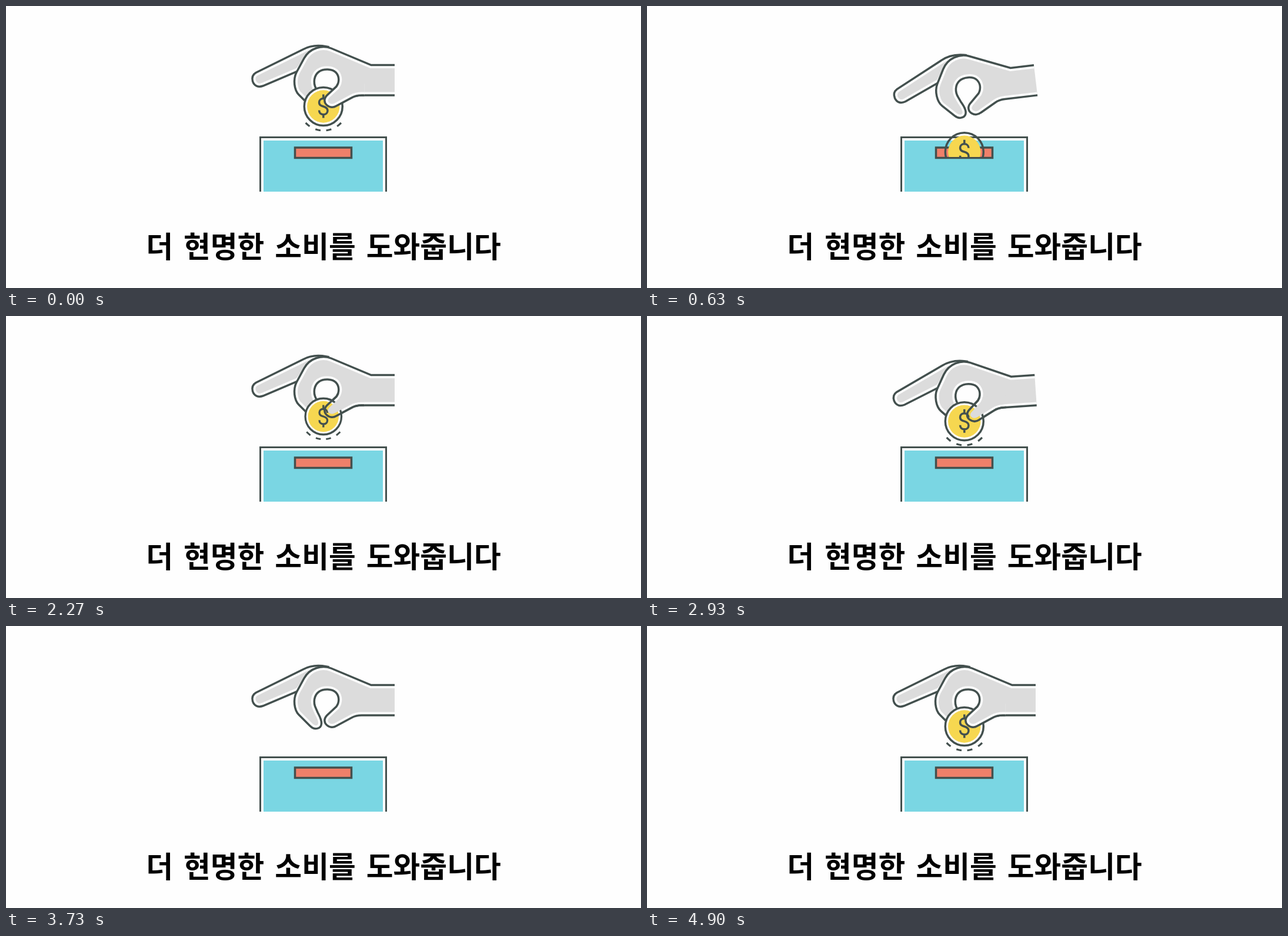
An HTML page with a canvas that plays this animation: 1080x480 px, repeating every 5010 ms.

```html
<!DOCTYPE html>
<html lang="ko">
<head>
<meta charset="utf-8">
<title>더 현명한 소비</title>
<style>
  html, body { margin: 0; width: 100%; height: 100%; overflow: hidden; background: #fefefe; }
  canvas, svg { position: absolute; left: 0; top: 0; width: 1080px; height: 480px; }
  text { font: 700 49.8px "Noto Sans CJK KR", "Noto Sans CJK", sans-serif; word-spacing: 4px; }
</style>
</head>
<body>
<canvas id="stage" width="1080" height="480"></canvas>
<svg viewBox="0 0 1080 480"><text x="540" y="428.3" text-anchor="middle">더 현명한 소비를 도와줍니다</text></svg>
<script>
const ctx = document.getElementById('stage').getContext('2d');
const layer = document.createElement('canvas');
layer.width = 1080;
layer.height = 480;
const thumb = layer.getContext('2d');

const LOOP = 5010;
const STARTS = [-1000, 1720, 4020]; // each cycle: coin pops in, hand dips, coin drops
const INK = '#43504e', PAPER = '#fefefe', SKIN = '#dcdcdc';
const GOLD = '#f6d750', BLUE = '#7ad6e3', RED = '#ef806a';

const PIVOT = { x: 661.5, y: 126 };
const COIN = { x: 539.8, y: 171 };
const DIP = 7.1 * Math.PI / 180;
const SLOT_FLOOR = 258;
const LINE = 3.5, GAP = 11;

const finger = new Path2D(
  'M545 69 C530 66 518 67 505 74 L425 113.5 C419 117 418 122 419.5 128' +
  ' C422 136 429 139 437 136 L498 110 L520 80 Z');
const palm = new Path2D(
  'M661 100.5 L621 100.5 L553 72 C538 66 517 71 507 89 L494 113' +
  ' C488 125 490 143 498 151 L517 170 C525 178 536 175 536.5 166' +
  ' C537 159 533 153 530 147 L527 140 C522 130 524 118 532 112' +
  ' C540 106 555 107 561 113 C567.5 120 567 130 562 137 L546 152' +
  ' C540 158 541 165 546 169 C551 173 557 173 562 170 L588 156' +
  ' Q595 152 605 152 L661 152');
const dollar = new Path2D(
  'M0 -20.5 V-13.5 M0 13.5 V19.5 M7.2 -6.5 C7 -11 3.5 -13.5 0 -13.5' +
  ' C-4.5 -13.5 -7.2 -10.5 -7.2 -7 C-7.2 -2 -3.5 -1 0 0' +
  ' C4.5 1.3 7.2 3 7.2 7 C7.2 11 4.5 13.7 0 13.7 C-4.5 13.7 -7.2 11 -7.2 6.5');

const clamp = v => Math.min(1, Math.max(0, v));
const part = (t, from, to) => clamp((t - from) / (to - from));
const smooth = v => v * v * (3 - 2 * v);

// Scale of the coin as it springs into place.
const SPRING = [[250, 1.13], [510, 0.935], [710, 1.035], [900, 1]];
function popScale(t) {
  if (t <= 0) return 0;
  if (t < 250) return 1.13 * Math.sin(t / 250 * Math.PI / 2);
  for (let i = 1; i < SPRING.length; i++) {
    const [t0, a] = SPRING[i - 1], [t1, b] = SPRING[i];
    if (t < t1) return a + (b - a) * smooth(part(t, t0, t1));
  }
  return 1;
}

function pose(time) {
  const start = STARTS.filter(s => s <= time).pop();
  const t = time - start;
  const angle = -DIP * (smooth(part(t, 1000, 1400)) - smooth(part(t, 1580, 2000)));
  const fall = part(t, 1400, 1700);
  const carry = (PIVOT.x - COIN.x) * Math.sin(t < 1400 ? -angle : DIP);
  return {
    angle,
    held: t < 1400,
    resting: t > 870 && t < 1030,
    scale: fall < 1 ? popScale(t) : 0,
    y: COIN.y + carry + 105 * fall * fall
  };
}

function disc(r, color) {
  ctx.fillStyle = color;
  ctx.beginPath();
  ctx.arc(0, 0, r, 0, Math.PI * 2);
  ctx.fill();
}

function drawBox() {
  ctx.fillStyle = BLUE;
  ctx.fillRect(438, 229, 203, 87);
  ctx.strokeStyle = INK;
  ctx.lineWidth = 3;
  ctx.beginPath();
  ctx.moveTo(432.5, 316);
  ctx.lineTo(432.5, 223.5);
  ctx.lineTo(646.5, 223.5);
  ctx.lineTo(646.5, 316);
  ctx.stroke();
  ctx.lineWidth = LINE;
  ctx.fillStyle = RED;
  ctx.fillRect(491.5, 241, 96, 17.5);
  ctx.strokeRect(491.5, 241, 96, 17.5);
}

function drawCoin(p) {
  ctx.save();
  ctx.beginPath();
  ctx.rect(0, 0, 1080, SLOT_FLOOR - 1);
  ctx.clip();
  ctx.translate(COIN.x, p.y);
  ctx.scale(p.scale, p.scale);
  if (p.held) disc(32.5, PAPER);
  disc(27.7, GOLD);
  ctx.strokeStyle = INK;
  ctx.lineWidth = LINE;
  ctx.beginPath();
  ctx.arc(0, 0, 32.5, 0, Math.PI * 2);
  ctx.stroke();
  ctx.stroke(dollar);
  ctx.lineWidth = 3.2;
  for (const deg of [49, 77, 103, 131]) {
    const mid = deg * Math.PI / 180;
    ctx.beginPath();
    ctx.arc(0, 0, 41, mid - 0.11, mid + 0.11);
    ctx.stroke();
  }
  ctx.restore();
}

function swing(c, angle) {
  c.translate(PIVOT.x, PIVOT.y);
  c.rotate(angle);
  c.translate(-PIVOT.x, -PIVOT.y);
}

function outline(c, path) {
  c.strokeStyle = INK;
  c.lineWidth = LINE;
  c.stroke(path);
}

// A shape whose fill stops short of its outline.
function inset(path) {
  ctx.save();
  ctx.fillStyle = SKIN;
  ctx.fill(path);
  ctx.clip(path);
  ctx.strokeStyle = PAPER;
  ctx.lineWidth = GAP;
  ctx.stroke(path);
  ctx.restore();
  outline(ctx, path);
}

function drawHand(angle) {
  ctx.save();
  swing(ctx, angle);
  inset(finger);
  inset(palm);
  ctx.restore();
}

// The thumb lies over the coin; its gap is see-through while anything moves.
function drawThumb(p) {
  thumb.clearRect(0, 0, 1080, 480);
  thumb.save();
  swing(thumb, p.angle);
  thumb.beginPath();
  thumb.rect(539.2, 132, 70, 50);
  thumb.clip();
  thumb.fillStyle = SKIN;
  thumb.fill(palm);
  thumb.globalCompositeOperation = 'destination-out';
  thumb.lineWidth = GAP;
  thumb.stroke(palm);
  thumb.globalCompositeOperation = 'source-over';
  outline(thumb, palm);
  if (p.resting) {
    thumb.globalCompositeOperation = 'destination-over';
    thumb.fillStyle = PAPER;
    thumb.fill(palm);
  }
  thumb.restore();
  ctx.drawImage(layer, 0, 0);
}

function draw(time) {
  const p = pose(time);
  ctx.fillStyle = PAPER;
  ctx.fillRect(0, 0, 1080, 480);
  drawBox();
  drawHand(p.angle);
  if (p.scale) {
    drawCoin(p);
    if (p.held) drawThumb(p);
  }
}

const began = performance.now();
function tick() {
  draw((performance.now() - began) % LOOP);
  requestAnimationFrame(tick);
}
tick();
</script>
</body>
</html>
```
